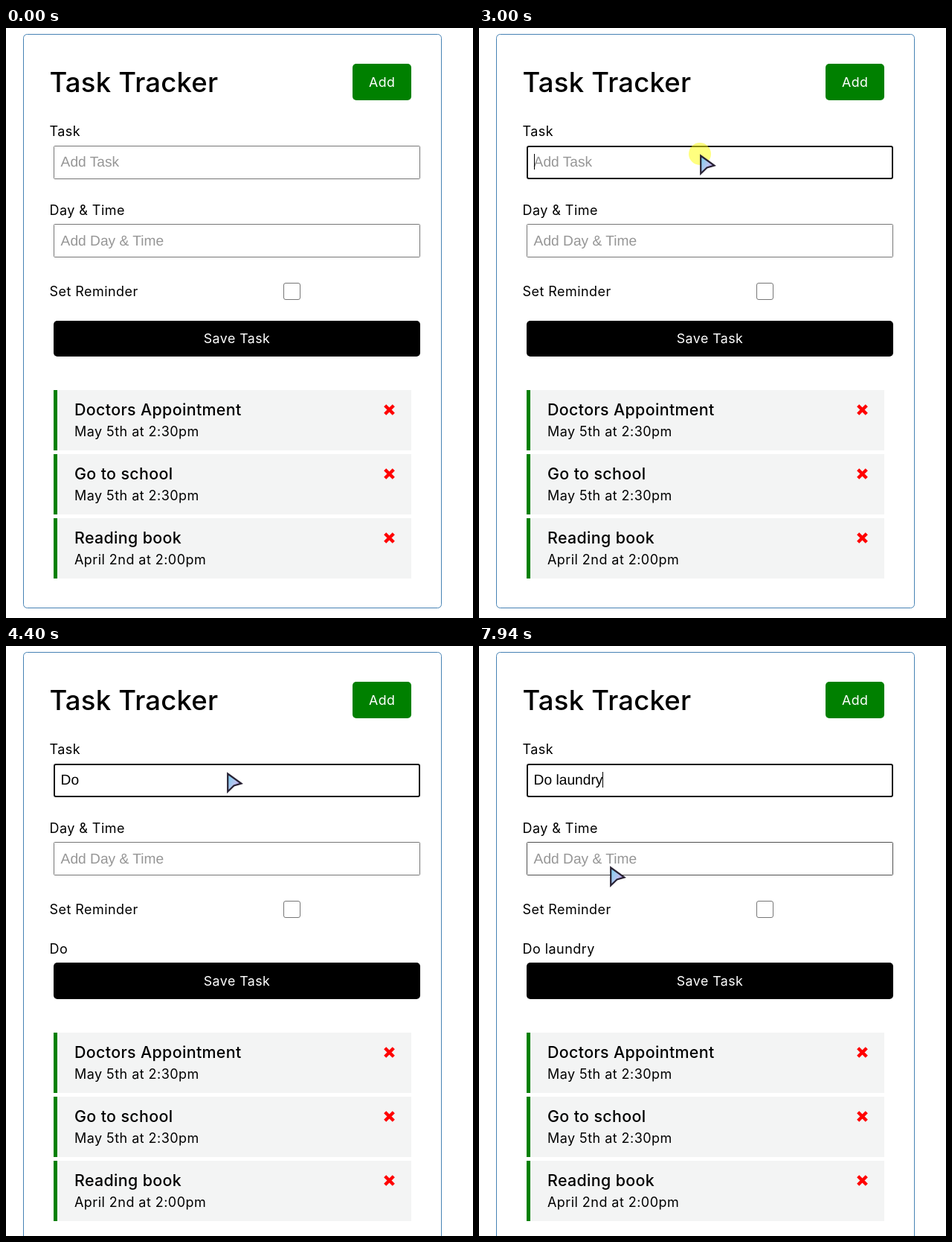
Animation, 628 px wide and 792 px high, one loop 8000 ms. Source, as an HTML page:

```html
<!DOCTYPE html>
<html lang="en">
<head>
<meta charset="utf-8">
<title>Task Tracker</title>
<style>
html, body { margin: 0; width: 100%; height: 100%; overflow: hidden; background: #fff; }
svg { display: block; width: 628px; height: 792px; }
text { font: 18px Inter, "Open Sans", sans-serif; letter-spacing: .45px; white-space: pre; }
.title { font-size: 36.5px; font-weight: 500; letter-spacing: .2px; }
.heading { font-size: 21.4px; font-weight: 500; letter-spacing: .35px; }
.button { font-size: 17.8px; fill: #fff; text-anchor: middle; }
.field { font: 19.2px "Liberation Sans", Arial, sans-serif; letter-spacing: 0; text-rendering: geometricPrecision; }
.box { fill: #fff; stroke: #767676; }
.hint { fill: #969696; }
</style>
</head>
<body>
<svg viewBox="0 0 628 792">
  <defs>
    <linearGradient id="sheen" x1="0" y1="0" x2="1" y2=".7">
      <stop offset=".2" stop-color="#8ccdf0"/>
      <stop offset=".6" stop-color="#b9c4f0"/>
      <stop offset="1" stop-color="#b078d0"/>
    </linearGradient>
  </defs>
  <rect id="card" x="23.5" y="8.5" width="562" height="770" rx="5" fill="#fff" stroke="steelblue"/>
  <text class="title" x="58.5" y="86">Task Tracker</text>
  <rect x="466" y="48" width="79" height="49" rx="5" fill="green"/>
  <text class="button" x="505.7" y="79">Add</text>

  <text x="58.5" y="145">Task</text>
  <rect id="taskBox" class="box"/>
  <text id="taskText" class="field" x="73.6" y="186"></text>
  <rect id="caret" y="169" width="1" height="21"/>

  <text x="58.5" y="251">Day &amp; Time</text>
  <rect id="dayBox" class="box" x="64.5" y="263.5" width="492" height="44" rx="1"/>
  <text class="field hint" x="73.6" y="292">Add Day &amp; Time</text>

  <text x="58.5" y="360">Set Reminder</text>
  <rect class="box" x="373.5" y="342.5" width="22" height="22" rx="2.5"/>

  <text id="echo" x="58.5" y="413"></text>
  <rect id="save" x="64" width="493" rx="5"/>
  <text id="saveText" class="button" x="310.5">Save Task</text>
  <g id="list"></g>

  <circle id="halo" cx="297" cy="169" r="15" fill="#ff0" fill-opacity=".5"/>
  <path id="pointer" d="M1.2 2.5 L19.5 15.5 L9.5 18.5 L1.2 26.5 Z" fill="url(#sheen)" stroke="#282234" stroke-width="2.2"/>
</svg>
<script>
const LOOP = 8000, STEP = 67, PHRASE = "Do laundry";
const $ = id => document.getElementById(id);
const set = (id, attrs) => {
  for (const name in attrs) $(id).setAttribute(name, attrs[name]);
};
const show = (id, on) => set(id, { visibility: on ? "visible" : "hidden" });
const countPast = (times, t) => times.filter(time => time <= t).length;

const keyTimes = [3070, 3140, 4270, 5000, 5130, 5260, 5810, 6470, 6670, 6740];
const caretToggles = [3000, 3410, 3740, 3810, 4270, 4400, 4800, 6340, 6470, 7270, 7800];
// time, x, y of the pointer tip
const path = [
  [920, 537, 655], [1120, 474, 572], [1380, 406, 501], [1520, 394, 492],
  [1710, 402, 505], [2170, 400, 460], [2330, 388, 282], [2530, 368, 255],
  [2670, 297, 169], [7270, 280, 184], [7400, 197, 256], [7560, 183, 299],
  [7700, 178, 308], [7940, 176, 295]
];
// the pointer rests until these times, then jumps
const restBefore = [2170, 2530, 7270];

const tasks = [
  ["Doctors Appointment", "May 5th at 2:30pm"],
  ["Go to school", "May 5th at 2:30pm"],
  ["Reading book", "April 2nd at 2:00pm"]
];
$("list").innerHTML = tasks.map(([name, day], i) => `
  <g transform="translate(64 ${486 + 86 * i})">
    <rect width="481" height="81" fill="#f3f4f4"/>
    <rect width="5" height="81" fill="green"/>
    <text class="heading" x="28" y="34">${name}</text>
    <text x="28" y="62">${day}</text>
    <path d="M445.7 20.7l11.6 11.6m0 -11.6l-11.6 11.6" stroke="red" stroke-width="4.4"/>
  </g>`).join("");

function pointerAt(t) {
  const i = path.findIndex(key => key[0] > t);
  if (i < 0) return path[path.length - 1].slice(1);
  if (i === 0) return null;
  const [t0, x0, y0] = path[i - 1], [t1, x1, y1] = path[i];
  if (restBefore.includes(t1)) return [x0, y0];
  const p = Math.floor((t - t0) / STEP) * STEP / (t1 - t0);
  return [x0 + (x1 - x0) * p, y0 + (y1 - y0) * p];
}

function drawPointer(t) {
  const tip = pointerAt(t);
  show("pointer", tip);
  if (tip) set("pointer", { transform: `translate(${tip.map(Math.round).join(" ")})` });
  return tip ? tip[1] : 0;
}

function render(t) {
  const typed = PHRASE.slice(0, countPast(keyTimes, t));
  const focused = t >= 3000, shift = typed ? 33 : 0;
  const tipY = drawPointer(t);
  const hover = top => tipY >= top && tipY <= top + 45;

  const inset = focused ? 1 : .5;
  set("taskBox", {
    x: 64 + inset, y: 158 + inset, width: 493 - 2 * inset, height: 45 - 2 * inset,
    rx: focused ? 2 : 1,
    style: focused ? "stroke:#101010;stroke-width:2" : hover(158) ? "stroke:#4f4f4f" : ""
  });
  set("dayBox", { style: hover(263) ? "stroke:#4f4f4f" : "" });

  const field = $("taskText");
  field.textContent = typed || "Add Task";
  field.classList.toggle("hint", !typed);
  set("caret", { x: typed ? Math.floor(73.6 + field.getComputedTextLength()) : 74 });
  show("caret", countPast(caretToggles, t) % 2 === 1);

  $("echo").textContent = typed;
  set("card", { height: 770 + shift });
  set("save", { y: typed ? 425 : 393, height: typed ? 49 : 48 });
  set("saveText", { y: 423 + shift });
  set("list", { transform: `translate(0 ${shift})` });
  show("halo", t >= 3000 && t < 3070);
}

function frame() {
  render(performance.now() % LOOP);
  requestAnimationFrame(frame);
}
frame();
</script>
</body>
</html>
```
